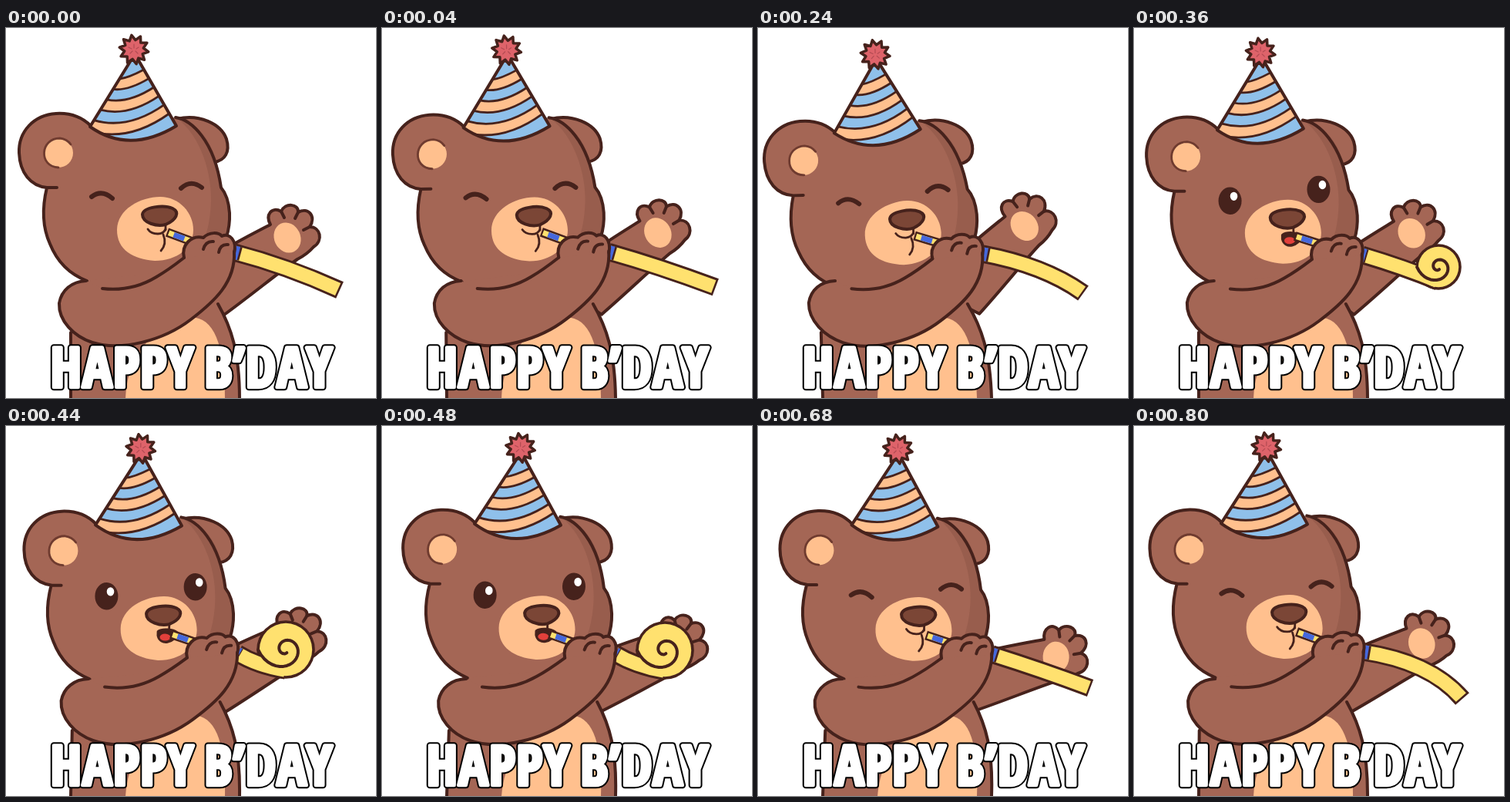
Animation, 480 px wide and 480 px high, one loop 840 ms. Source, as an HTML page:

```html
<!DOCTYPE html>
<html lang="en">
<head>
<meta charset="utf-8">
<title>Happy b'day bear</title>
<style>
  html, body { margin: 0; height: 100%; overflow: hidden; background: #fff; }
  svg { display: block; width: 100vw; height: 100vh; stroke-linecap: round; stroke-linejoin: round; }
  .main { fill: #a46655; }
  .shade { fill: #985d4d; }
  .cream { fill: #ffc08e; }
  .line { stroke: #46221c; stroke-width: 4; }
  .thin { stroke: #46221c; stroke-width: 2.8; }
  .open { fill: none; }
  .dark { fill: #46221c; }
  .tube { fill: none; stroke-linecap: butt; }
  .caption { font-weight: 900; font-stretch: ultra-condensed; letter-spacing: .015em; word-spacing: -.08em; text-anchor: middle; }
</style>
</head>
<body>
<svg viewBox="0 0 480 480">
  <g id="body">
    <g id="wave">
      <path class="main line" d="M262 300C290 282 318 268 343 255C336 242 345 231 357 238C362 226 380 228 379 239C392 232 403 244 394 258C408 258 412 276 399 284C392 292 386 296 378 300C350 320 320 345 283 372L255 350Z"/>
      <path class="open line" d="M357 238l4 8M379 239l-4 8M394 258l-8 4"/>
      <ellipse class="cream" cx="365" cy="272" rx="17" ry="20" transform="rotate(-25 365 272)"/>
    </g>
    <path class="main" d="M84 480V385L92 340L106 312L270 295L277 362C292 388 304 420 304 480Z"/>
    <path class="cream" d="M155 482C156 440 175 400 225 378C265 365 284 400 284 482"/>
    <path class="open line" d="M84 482V395M275 358C292 388 303 420 303 482"/>
  </g>

  <g id="horn">
    <path class="tube" stroke="#46221c" stroke-width="23.5"/>
    <circle class="dark"/>
    <path class="tube" stroke="#ffe16f" stroke-width="17.5" pathLength="100" stroke-dasharray="98.2 100"/>
    <circle fill="#ffe16f"/>
    <path class="tube" stroke="#46221c" stroke-width="17.5" pathLength="100" stroke-dasharray="6 100"/>
    <path class="tube" stroke="#4668dc" stroke-width="17.5" pathLength="100" stroke-dasharray="4.2 100"/>
    <path class="open line" id="spiral"/>
  </g>

  <g id="head">
    <path class="main line" d="M222 118C250 111 279 124 286 144C291 161 284 172 270 174"/>
    <path class="main" d="M105 328C84 320 67 305 57 280C47 258 47 232 53 207C32 205 18 188 17 162C16 134 36 113 65 111C82 110 98 115 110 127L220 116C240 119 270 145 279 207C285 214 289 225 290 240C292 270 276 300 258 310Z"/>
    <path class="shade" d="M222 117C254 142 267 190 266 225C265 250 261 270 250 288L272 300C288 282 292 262 290 240C289 225 285 214 279 207C276 170 262 125 222 117Z"/>
    <path class="open line" d="M105 328C84 320 67 305 57 280C47 258 47 232 53 207C32 205 18 188 17 162C16 134 36 113 65 111C82 110 98 115 110 127M53 207H66M220 116C240 119 270 145 279 207C285 214 289 225 290 240C291 262 284 283 272 298"/>
    <circle class="cream" cx="68" cy="162" r="19"/>
    <path class="open" stroke="#6f3b2f" stroke-width="2.8" d="M68 181C42 180 44 143 70 143Q79 144 84 151"/>
    <path class="cream" d="M144 262C144 235 175 219 200 219C225 219 243 240 243 262C243 285 222 302 193 302C165 300 144 288 144 262Z"/>
    <path class="line" fill="#7b4636" d="M177 242C178 232 205 229 216 234C226 239 221 249 207 255C196 258 177 253 177 242Z"/>
    <path class="open thin" d="M207 255V262"/>
    <path id="lips" class="open thin" d="M184 261Q188 267 197 267Q204 267 207 261M204 268Q209 280 201 289"/>
    <g id="mouth">
      <path class="dark line" d="M193 265C198 261 212 262 217 266C214 279 196 283 193 270Z"/>
      <ellipse cx="202" cy="272" rx="7" ry="4.5" fill="#e2403b"/>
    </g>
    <path id="closed" class="open line" style="stroke-width:6" d="M111 219Q124 209 138 221M227 208Q240 196 254 207"/>
    <g id="eyes">
      <g><circle class="dark" r="15"/><circle cx="5" cy="-5" r="4.8" fill="#fff"/></g>
      <g><circle class="dark" r="15"/><circle cx="5" cy="-5" r="4.8" fill="#fff"/></g>
    </g>
    <clipPath id="cone"><path d="M162 42L109 128Q160 164 221 127L172 42Z"/></clipPath>
    <g id="hat"></g>
  </g>

  <g id="mouthpiece">
    <path class="tube" stroke="#46221c" stroke-width="12"/>
    <path class="tube" stroke="#ffe16f" stroke-width="7" pathLength="100" stroke-dasharray="0 5 100"/>
    <path class="tube" stroke="#4668dc" stroke-width="7" pathLength="100" stroke-dasharray="0 20 32 100"/>
  </g>

  <g id="arm">
    <path class="main" d="M125 338C150 341 175 335 195 323C212 313 222 305 231 298L262 275L297 295C294 330 270 355 240 378C205 405 150 420 112 408C88 400 68 380 69 357C72 340 85 329 104 328Z"/>
    <path class="main line" d="M231 298C227 282 240 268 256 272C264 264 276 265 280 270C290 265 300 276 296 292"/>
    <path class="open line" d="M125 338C150 341 175 335 195 323C212 313 222 305 231 298M296 290C298 330 270 355 240 378C205 405 150 420 112 408C88 400 68 380 69 357C72 340 85 329 104 328M256 287Q259 276 269 277M276 291Q278 280 288 281"/>
  </g>
  <text class="caption" x="241" stroke="#000" stroke-width="8.5">HAPPY B’DAY</text>
  <text class="caption" x="241" fill="#fff" stroke="#fff" stroke-width="4.5" aria-hidden="true">HAPPY B’DAY</text>
</svg>
<script>
const LOOP = 840, STEP = 40;
const $ = id => document.getElementById(id);
const all = selector => [...document.querySelectorAll(selector)];
const set = (el, attrs) => { for (const k in attrs) el.setAttribute(k, attrs[k]); };
const show = (id, on) => { $(id).style.display = on ? '' : 'none'; };

// time, head x, head y, head tilt, waving arm angle, hand y
const POSE = [
  [0, 0, 0, 0, 0, 0], [120, -6, 2, -1.1, -9, 1], [240, -6, 5, -2.1, -11, 2],
  [440, 5, 2, 1, 4, 4], [560, 13, 0, 2.1, 19, 5], [680, 9, 3, 1.7, 17, 5], [800, 2, 0, 1, 6.5, 2]
];
// time, tip x, tip y, bend x, bend y, roll radius
const HORN = [
  [0, 433, 340, 365, 309, 0], [120, 423, 344, 372, 306, 0], [240, 422, 344, 372, 308, 0],
  [320, 414, 335, 365, 310, 20], [360, 395, 329, 352, 311, 28], [440, 363, 317, 326, 311, 36],
  [480, 367, 318, 330, 312, 36], [560, 413, 332, 360, 318, 29], [600, 433, 336, 370, 317, 15],
  [640, 441, 338, 372, 316, 0], [680, 431, 340, 370, 317, 0], [800, 426, 354, 385, 306, 0]
];

// Smooth cyclic interpolation through unevenly timed rows
function sample(rows, t) {
  const n = rows.length;
  const key = i => {
    const row = rows[(i + n) % n];
    return [row[0] + LOOP * Math.floor(i / n), ...row.slice(1)];
  };
  const i = rows.findLastIndex(r => r[0] <= t);
  const [a, b, c, d] = [-1, 0, 1, 2].map(k => key(i + k));
  const span = c[0] - b[0], u = (t - b[0]) / span;
  const slope = (p, q, r, j) => {
    const h = q[0] - p[0], k = r[0] - q[0];
    return ((q[j] - p[j]) / h * k + (r[j] - q[j]) / k * h) / (h + k) * span;
  };
  return b.slice(1).map((p, index) => {
    const j = index + 1, rise = c[j] - p;
    const m = slope(a, b, c, j), w = slope(b, c, d, j);
    return p + u * (m + u * (3 * rise - 2 * m - w + u * (m + w - 2 * rise)));
  });
}

function buildHat() {
  const stripe = i => {
    const l = 66 + 13.4 * i, r = 54 + 11.4 * i;
    return { l: [162 - (l - 42) * .616, l], r: [172 + (r - 42) * .576, r], mid: [158, (l + r) / 2 + 5 + 4.5 * i] };
  };
  const cone = $('cone').firstChild.getAttribute('d');
  let bands = '';
  for (const i of [0, 2, 4]) {
    const a = stripe(i), b = stripe(i + 1);
    bands += `<path class="cream thin" d="M${a.l}Q${a.mid} ${a.r}L${b.r}Q${b.mid} ${b.l}Z"/>`;
  }
  const spikes = Array.from({ length: 20 }, (_, i) => {
    const r = i % 2 ? 12.5 : 19, a = i * Math.PI / 10 + .15;
    return [166 + r * Math.cos(a), 28 + r * Math.sin(a)].map(v => v.toFixed(1));
  });
  $('hat').innerHTML = `<path fill="#8fc0ea" d="${cone}"/><g clip-path="url(#cone)">${bands}</g>
    <path class="open line" d="${cone}"/>
    <polygon class="line" style="stroke-width:3.5" fill="#de636a" points="${spikes.join(' ')}"/>
    <path class="open" stroke="#b34b53" stroke-width="1.2" d="M166 21v5M172 25l-3 2M171 33l-3-3M161 33l3-3M159 25l4 2"/>`;
}

// Use the narrowest heavy face at the size that fills the line
function fitCaption() {
  const texts = all('.caption');
  const faces = ['Noto Sans', 'Open Sans', 'Roboto', 'Open Sans Condensed', 'Roboto Condensed', 'Liberation Sans Narrow'];
  const style = (face, size) => texts.forEach(text => {
    text.style.font = `900 ultra-condensed ${size}px "${face}", sans-serif`;
    set(text, { y: 440 + .357 * size });
  });
  const width = face => {
    style(face, 100);
    return texts[0].getComputedTextLength();
  };
  const [narrowest, face] = faces.map(f => [width(f), f]).sort((a, b) => a[0] - b[0])[0];
  style(face, Math.min(82, 36700 / narrowest));
}

function drawHorn(t, x, y) {
  const [tipX, tipY, bendX, bendY, radius] = sample(HORN, t);
  const rolled = radius > 9, cy = tipY - radius + 9;
  const d = `M${x} ${y}Q${bendX} ${bendY} ${tipX} ${tipY}`;
  all('#horn .tube').forEach(p => set(p, { d }));
  all('#horn circle').forEach((c, i) =>
    set(c, { cx: tipX, cy, r: rolled ? radius + (i ? -1.8 : 1.8) : 0 }));
  const points = [];
  for (let i = 0; i <= 40; i++) {
    const u = i / 40, rest = 1 - u, a = Math.PI * (1 - 2.6 * u);
    const r = radius * (.12 + .5 * rest + .38 * rest ** 8);
    points.push([tipX + r * Math.cos(a), cy + r * Math.sin(a)]);
  }
  set($('spiral'), { d: rolled ? 'M' + points.join('L') : '' });
}

function drawFace(t) {
  const openness = Math.min(1, (t - 280) / 80, (680 - t) / 150);
  const awake = openness > .4, inhaling = t >= 360 && t <= 480;
  const [left, right] = $('eyes').children;
  const squash = `scale(1 ${1.18 * Math.max(0, openness)})`;
  set(left, { transform: `translate(125 220) ${squash}` });
  set(right, { transform: `translate(240 206) ${squash}` });
  show('eyes', awake);
  show('closed', !awake);
  show('mouth', inhaling);
  show('lips', !inhaling);
}

function draw(now) {
  const t = Math.floor(now % LOOP / STEP) * STEP;
  const [dx, dy, tilt, wave, hand] = sample(POSE, t);
  const lean = dx / 235;
  set($('body'), { transform: `matrix(1 0 ${-lean} 1 ${480 * lean} 0)` });
  set($('wave'), { transform: `rotate(${wave} 280 335)` });
  set($('head'), { transform: `translate(${dx} ${dy}) rotate(${tilt} 199 243)` });
  set($('arm'), { transform: `matrix(1 ${hand / 200} ${-lean} 1 ${480 * lean} ${-hand / 2})` });
  const d = `M${209 + dx} ${265 + dy / 2 + hand}L${252 + .85 * dx} ${281 + .85 * hand}`;
  all('#mouthpiece path').forEach(p => set(p, { d }));
  drawHorn(t, 296 + .8 * dx, 291 + hand);
  drawFace(t);
}

buildHat();
fitCaption();
const start = performance.now();
(function tick() {
  draw(performance.now() - start);
  requestAnimationFrame(tick);
})();
</script>
</body>
</html>
```
